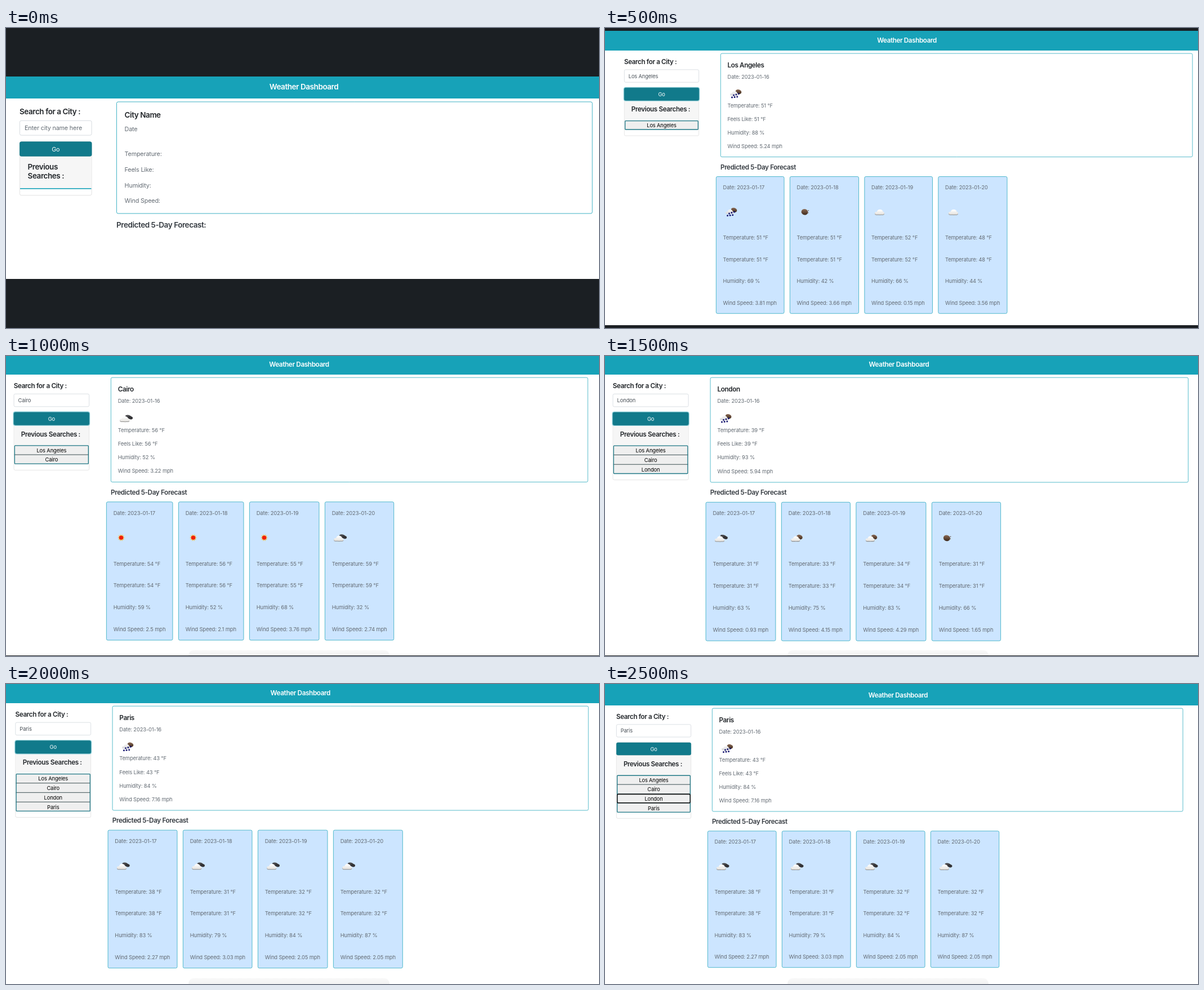
These frames come from a looping animation (1053 by 532 pixels, 3 s). An HTML page with a canvas:

```html
<!DOCTYPE html>
<html lang="en">
<head>
<meta charset="utf-8">
<title>Weather Dashboard</title>
<style>
  html, body { margin: 0; width: 100%; height: 100%; overflow: hidden; background: #1b1f23; }
  canvas { display: block; width: 1053px; height: 532px; }
</style>
</head>
<body>
<canvas id="stage" width="1053" height="532"></canvas>
<script>
const W = 1053, H = 532, STEP = 500;
const ctx = document.getElementById('stage').getContext('2d');
const TEAL = '#17a2b8', INK = '#212529', GRAY = '#636b73';

// now: [icon, temperature, humidity, wind]; days: the same for each following day
const reports = {
  'Los Angeles': {
    now: ['rain', 51, 88, 5.24],
    days: [['rain', 51, 69, 3.81], ['moon', 51, 42, 3.66], ['cloud', 52, 66, 0.15], ['cloud', 48, 44, 3.56]]
  },
  Cairo: {
    now: ['broken', 56, 52, 3.22],
    days: [['sun', 54, 59, 2.5], ['sun', 56, 52, 2.1], ['sun', 55, 68, 3.76], ['broken', 59, 32, 2.74]]
  },
  London: {
    now: ['rain', 39, 93, 5.94],
    days: [['broken', 31, 63, 0.93], ['few', 33, 75, 4.15], ['few', 34, 83, 4.29], ['moon', 31, 66, 1.65]]
  },
  Paris: {
    now: ['rain', 43, 84, 7.16],
    days: [['broken', 38, 83, 2.27], ['broken', 31, 79, 3.03], ['broken', 32, 84, 2.05], ['broken', 32, 87, 2.05]]
  }
};
const cities = Object.keys(reports);

// k: zoom, top/head/end: page top, header bottom, page bottom,
// side/main: [left, right], cols: card lefts and the end of the row
const scenes = [
  { k: .694, top: 86, head: 125, end: 445, title: 529, side: [24, 152.5], main: [196, 1041.5], found: 0 },
  { k: .599, top: 5, head: 40, end: 527, title: 536, side: [34, 167], main: [205, 1043.5],
    cols: [197, 328, 460.5, 591.5, 724], city: 'Los Angeles', found: 1, ring: true },
  { k: .605, top: 0, head: 33, end: 531, title: 520.5, side: [13.7, 148], main: [186, 1033.5],
    cols: [178, 306, 432, 566, 698.7], city: 'Cairo', found: 2, ring: true, dock: true },
  { k: .6065, top: 0, head: 33, end: 531, title: 522, side: [13.7, 148.5], main: [186.7, 1036],
    cols: [178.7, 313, 445.5, 580, 712.7], city: 'London', found: 3, ring: true, dock: true },
  { k: .6035, top: 0, head: 34, end: 532, title: 522.8, side: [16.5, 151], main: [188.7, 1034.5],
    cols: [180.7, 314, 447, 581, 714.3], city: 'Paris', found: 4, ring: true, dock: true },
  { k: .597, top: 0, head: 38, end: 532, title: 520.5, side: [20, 153], main: [190, 1026.5],
    cols: [182, 314, 446, 578, 709.7], city: 'Paris', found: 4, focus: 2, dock: true }
];

let k, y0;
const at = v => y0 + v * k;

function rect(x, y, w, h, fill) {
  ctx.fillStyle = fill;
  ctx.fillRect(x, y, w, h);
}

// the border lies inside the given edges
function box(l, t, r, b, fill, stroke, line = 1.2 * k, radius = 4 * k) {
  ctx.beginPath();
  ctx.roundRect(l + line / 2, t + line / 2, r - l - line, b - t - line, radius);
  if (fill) { ctx.fillStyle = fill; ctx.fill(); }
  if (stroke) { ctx.strokeStyle = stroke; ctx.lineWidth = line; ctx.stroke(); }
}

// y is the middle of the capitals
function write(str, x, y, color, { big = false, align = 'left' } = {}) {
  const size = (big ? 20 : 16) * k;
  ctx.font = `${big ? 600 : 400} ${size * .97}px Inter, "Open Sans", sans-serif`;
  ctx.letterSpacing = size * (big ? -.03 : -.014) + 'px';
  ctx.textAlign = align;
  ctx.fillStyle = color;
  ctx.fillText(str, x, y + size * .35);
}

function oval(x, y, rx, ry, fill, turn = 0) {
  ctx.beginPath();
  ctx.ellipse(x, y, rx, ry, turn, 0, 7);
  ctx.fillStyle = fill;
  ctx.fill();
}

function shade(y1, y2, a, b) {
  const g = ctx.createLinearGradient(0, y1, 0, y2);
  g.addColorStop(0, a);
  g.addColorStop(1, b);
  return g;
}

function mound(x, y, w, fill) {
  ctx.beginPath();
  ctx.ellipse(x + w * .04, y, w * .32, w * .27, 0, 0, 7);
  ctx.roundRect(x - w / 2, y - w * .02, w, w * .28, w * .14);
  ctx.fillStyle = fill;
  ctx.fill();
}

function whiteCloud(x, y, w) {
  mound(x, y + 1, w, '#8f8f8d');
  mound(x, y, w, shade(y - 4, y + 5, '#ffffff', '#e2e0dc'));
}

function globe(x, y, rx, ry) {
  oval(x, y, rx, ry, shade(y - ry, y + ry, '#8a6a55', '#3f2a1c'), .3);
}

const icons = {
  rain() {
    globe(4.5, -3.5, 5.4, 4);
    mound(-3, -.5, 15, shade(-5, 4, '#fafafa', '#d3d3d6'));
    for (let i = 0; i < 3; i++) {
      oval(-4 + i * 4.4, 2.6 - i * 1.3, 1.4, 1.5, '#14146e');
      oval(-7 + i * 4.6, 6.4 - i * .5, 1.5, 1.5, '#14146e');
    }
  },
  moon() {
    globe(-1, 0, 6, 5.2);
    oval(5.6, -2.6, .9, .8, '#5b4433');
    oval(5.4, 1.4, .7, .7, '#7a6655');
  },
  cloud() {
    whiteCloud(-.5, 0, 17);
  },
  broken() {
    oval(3.5, -2.8, 5.5, 2.9, '#47474a', .25);
    oval(7.2, -.8, 4, 2.7, '#333336', .2);
    whiteCloud(-3, 1.2, 17);
  },
  few() {
    globe(4.5, -1.8, 5.4, 4.1);
    whiteCloud(-2.5, 1, 16);
  },
  sun() {
    ctx.beginPath();
    for (let i = 0; i < 20; i++) {
      const r = i % 2 ? 3.8 : 6.3, a = i * Math.PI / 10;
      ctx.lineTo(-1.3 + r * Math.cos(a), r * Math.sin(a));
    }
    ctx.fillStyle = '#f3b13c';
    ctx.fill();
    oval(-1.3, 0, 3.6, 3.4, '#f01d0c');
  }
};

function icon(name, x, y) {
  ctx.save();
  ctx.translate(x + 25 * k, y);
  ctx.scale(k / .6, k / .6);
  icons[name]();
  ctx.restore();
}

function drawList(s, l, r, mid) {
  const top = i => at(207 + 27.8 * i);
  rect(l, top(0), r - l, top(s.found) - top(0), '#efefef');
  for (let i = 0; i < s.found; i++) {
    if (i) rect(l, top(i) - .6, r - l, 1.2, '#5a6a6d');
    write(cities[i], mid, (top(i) + top(i + 1)) / 2 + .6, '#000', { align: 'center' });
  }
  box(l, top(0), r, top(s.found), null, '#1f7886', 1.3, 1);
  if (s.focus) box(l, top(s.focus), r, top(s.focus + 1), null, '#101010', 1.4, 2);
}

function drawSide(s) {
  const [l, r] = s.side, mid = (l + r) / 2;
  write('Search for a City :', l, at(33.3), INK, { big: true });
  box(l, at(56), r, at(94.5), '#fff', '#ced4da');
  write(s.city || 'Enter city name here', l + 13 * k, at(75.5), s.city ? '#495057' : GRAY);

  const list = s.found ? 207 : 230, end = list + 18 + 27.8 * s.found;
  box(l, at(140), r, at(end), '#fff', '#dcdcdc');
  rect(l + 1, at(146), r - l - 2, (list - 146) * k, '#f6f6f6');
  if (s.ring) box(l - 1.2, at(110) - 1.2, r + 1.2, at(148) + 1.2, null, 'rgba(23,162,184,.5)', 2, 5 * k);
  box(l, at(110), r, at(148), '#117a8b', '#10707f');
  write('Go', mid, at(129.3), '#fff', { align: 'center' });

  if (s.found) {
    write('Previous Searches :', mid - 1.5, at(174), INK, { big: true, align: 'center' });
    drawList(s, l + 1, r - 1, mid);
  } else {
    write('Previous', l + 21 * k, at(174), INK, { big: true });
    write('Searches :', l + 21 * k, at(198), INK, { big: true });
    rect(l + 1, at(list) - .6, r - l - 2, 1.6, TEAL);
  }
}

function drawMain(s) {
  const [l, r] = s.main, x = l + 21 * k, now = s.city && reports[s.city].now;
  box(l, at(8), r, at(now ? 315.5 : 294.5), '#fff', TEAL);
  write(s.city || 'City Name', x, at(42.6), INK, { big: true });
  write(now ? 'Date: 2023-01-16' : 'Date', x, at(77.5), GRAY);
  const [kind, temp, wet, wind] = now || [];
  const rows = now
    ? [`Temperature: ${temp} °F`, `Feels Like: ${temp} °F`, `Humidity: ${wet} %`, `Wind Speed: ${wind} mph`]
    : ['Temperature:', 'Feels Like:', 'Humidity:', 'Wind Speed:'];
  rows.forEach((row, i) => write(row, x, at((now ? 162.5 : 141.5) + 40 * i), GRAY));
  if (now) icon(kind, x, at(128));
  write('Predicted 5-Day Forecast' + (now ? '' : ':'), l, at(now ? 344.5 : 323.5), '#343a40', { big: true });
}

function drawDays(s) {
  reports[s.city].days.forEach(([kind, temp, wet, wind], i) => {
    const l = s.cols[i], x = l + 21 * k;
    box(l, at(372.5), s.cols[i + 1] - 16 * k, at(779), '#cce5ff', TEAL);
    write(`Date: 2023-01-${17 + i}`, x, at(405.3), GRAY);
    icon(kind, x, at(478));
    [`Temperature: ${temp} °F`, `Temperature: ${temp} °F`, `Humidity: ${wet} %`, `Wind Speed: ${wind} mph`]
      .forEach((row, n) => write(row, x, at(554 + 64.2 * n), GRAY));
  });
}

function draw(s) {
  k = s.k;
  y0 = s.head;
  rect(0, 0, W, H, '#1b1f23');
  rect(0, s.top, W, s.end - s.top, '#fff');
  if (s.dock) {
    ctx.beginPath();
    ctx.roundRect(324, 521.5, 357, s.end - 521.5, [10, 10, 0, 0]);
    ctx.fillStyle = shade(520, 532, '#fafafa', '#f2f2f2');
    ctx.fill();
  }
  rect(0, s.top, W, s.head - s.top, TEAL);
  write('Weather Dashboard', s.title, at(-30), '#fff', { big: true, align: 'center' });
  drawSide(s);
  drawMain(s);
  if (s.city) drawDays(s);
}

const start = performance.now();
function tick() {
  const t = performance.now() - start;
  draw(scenes[Math.floor(t / STEP) % scenes.length]);
  requestAnimationFrame(tick);
}
tick();
</script>
</body>
</html>
```
